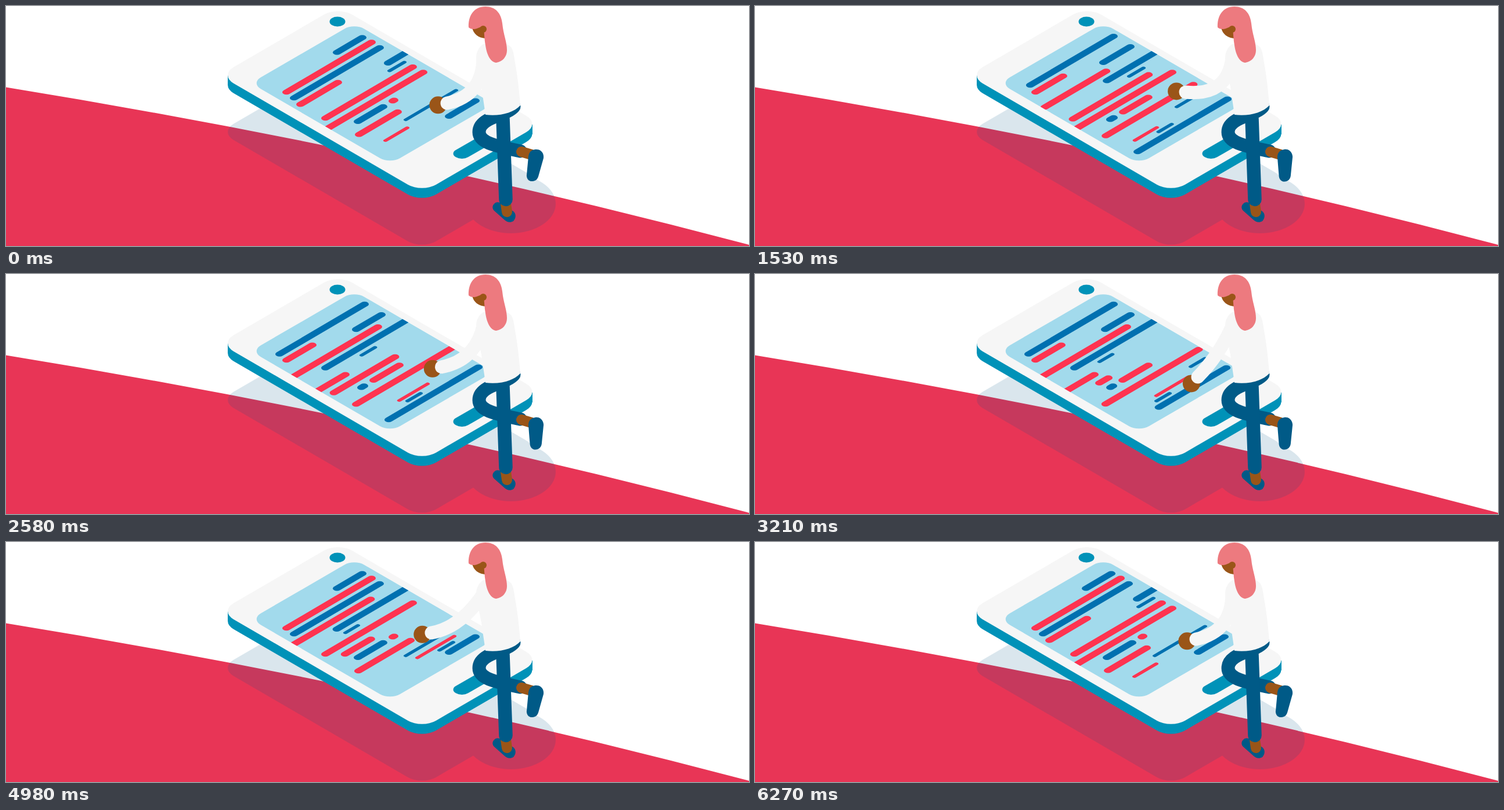
Animation of 1280x415 px, one loop 6.3 s. Source, as an HTML page:

```html
<!DOCTYPE html>
<html lang="en">
<head>
<meta charset="utf-8">
<title>Phone coding</title>
<style>
  html, body { margin: 0; width: 100%; height: 100%; overflow: hidden; background: #fff; }
  svg { display: block; width: 100%; height: 100%; }
  .round { fill: none; stroke-linecap: round; }
</style>
</head>
<body>
<svg viewBox="0 0 1280 415">
  <defs>
    <!-- Isometric plates: rounded rectangles turned 45 degrees, then flattened -->
    <rect id="plate" width="493" height="288.5" rx="34" transform="translate(572 .8) scale(1 .583) rotate(45)"/>
    <rect id="screen" width="339" height="252" rx="24" transform="translate(600 29.5) scale(1 .583) rotate(45)"/>
    <clipPath id="screenClip"><use href="#screen"/></clipPath>
  </defs>

  <path fill="#e83556" d="M0 140.500Q665 249 1280 413V415H0Z"/>
  <g fill="#005587" opacity=".14">
    <use href="#plate" y="98"/>
    <ellipse cx="870" cy="342" rx="77" ry="51"/>
  </g>

  <g fill="#0092b8">
    <use href="#plate" y="17"/>
    <path d="M382 120L907 205V222L382 137Z"/>
  </g>
  <use href="#plate" fill="#f6f6f6"/>
  <ellipse cx="571" cy="27" rx="13.500" ry="8.500" fill="#0092b8"/>
  <use href="#screen" fill="#a2daec"/>
  <g clip-path="url(#screenClip)">
    <g id="bars" class="round" transform="scale(1 .59)"></g>
  </g>
  <path class="round" transform="scale(1 .58)" stroke="#0092b8" stroke-width="30" d="M785.500 440L818 407.500"/>

  <!-- Legs -->
  <g class="round" stroke="#005a87">
    <path stroke-width="23" d="M875 174C862 190 815 192 815 218C815 238 850 243 886 251"/>
    <path stroke="#9a5518" stroke-width="18" d="M888 252L905 257"/>
    <path id="shoe" fill="#005a87" stroke="none"
      d="M900 260C901 252 906 248 914 248C922 248 927 255 926 263L917 295C915 301 911 303 906 303C900 303 896.500 298 897 292Z"/>
    <path fill="#005a87" stroke="none"
      d="M841 342C845 338 850 339 854 342L874 355C880 360 878 368 874 372C869 375 863 374 859 370L841 354C837 350 838 345 841 342Z"/>
    <path stroke="#9a5518" stroke-width="18" d="M861 342L863 356"/>
    <path stroke-width="23.500" d="M856 195L861 334.500"/>
  </g>

  <!-- Arm and upper body -->
  <circle id="hand" r="15" fill="#9a5518"/>
  <path id="arm" class="round" stroke="#f6f6f6" stroke-width="23"/>
  <path fill="#f6f6f6" d="M822 66C812 73 808 84 811 98L819 140L826 188C850 191 874 185 886 172C884 140 879 108 874 80C872 72 868 68 862 66Z"/>
  <path fill="#9a5518" d="M803 37C805 48 813 55 826 56V34Z"/>
  <path fill="#ed7a7f" d="M797 37C796 17 806 1 826 1C844 1 853 13 855 30C857 50 863 62 863 76C863 90 853 97 844 98C833 96 828 82 826 68C824 56 824 48 823 36C817 35 813 40 806 40Q800 40 797 37Z"/>
  <circle cx="822" cy="40" r="6" fill="#9a5518"/>
</svg>

<script>
const LOOP = 6300, SLOPE = 0.59, FIRST_ROW = 416.6, ROW_PITCH = 17.6, HAND_OFFSET = 16;
const BLUE = '#0070b0', RED = '#ff3350', THICK = 14.5, THIN = 7.5;
const byId = id => document.getElementById(id);
const clamp = v => Math.min(1, Math.max(0, v));
const mix = (a, b, u) => a + (b - a) * u;

// 0 at rest, 1 when fully moved: leaves at `out`, returns from `back`.
const away = (t, { out, back, outSpan = 1000, backSpan = 1000 }) =>
  clamp((t - out) / outSpan) - clamp((t - back) / backSpan);

// Waves of edits passing over the screen.
const EARLY = { out: 350, back: 2860 };
const MAIN = { out: 560, back: 3840 };
const LATE = { out: 1050, back: 4800 };
const SLOW = { out: 1000, back: 5000, outSpan: 2500, backSpan: 1270 };
const STEP = { out: 1060, back: 3300, outSpan: 470, backSpan: 860 };

const bars = [];

// A bar spans left..right on its row; `move` is how far each edge travels during its wave.
function bar(color, width, row, left, right, wave, move) {
  const node = document.createElementNS('http://www.w3.org/2000/svg', 'path');
  node.setAttribute('stroke', color);
  node.setAttribute('stroke-width', width);
  byId('bars').append(node);
  const axis = (FIRST_ROW + ROW_PITCH * row) / SLOPE;
  bars.push(t => {
    const u = away(t, wave);
    const x1 = left + width / 2 + (move.left || 0) * u;
    const x2 = right - width / 2 + (move.right || 0) * u;
    node.setAttribute('d', `M${x1} ${axis - x1}L${x2} ${axis - x2}`);
  });
}

bar(BLUE, THICK, 0, 563, 621, MAIN, { left: -99, right: 4 });
bar(RED, THICK, 1, 476, 637, MAIN, { right: -102 });
bar(BLUE, THICK, 2, 489, 651, { ...MAIN, back: 3435 }, { left: 107, right: 3 });
bar(RED, THICK, 3, 500, 579, LATE, { left: -17, right: 69 });
bar(BLUE, THICK, 4, 651, 705, LATE, { left: -108 });
bar(BLUE, THIN, 4.85, 657, 690, SLOW, { left: -76, right: -80 });
bar(RED, THICK, 5.8, 543, 708, { ...MAIN, out: 1335 }, { left: -13, right: -116 });
bar(RED, THICK, 6.93, 535, 726, { ...LATE, out: 2140 }, { left: 51, right: -110 });
bar(BLUE, THICK, 8, 599, 657, MAIN, { left: 6, right: -33 });
bar(RED, THICK, 8, 659, 676, MAIN, { left: -33, right: 9 });
bar(RED, THICK, 9.35, 601, 682, { ...EARLY, out: 750, backSpan: 2700 }, { left: -5, right: 103 });
bar(BLUE, THIN, 10.6, 685, 779, { ...MAIN, out: 920 }, { left: 62 });
bar(RED, THIN, 11.47, 650, 695, { ...SLOW, out: 1500 }, { left: 55, right: 81 });
bar(BLUE, THIN, 12, 810, 842, { ...MAIN, back: 4530 }, { left: -122, right: -124 });
bar(BLUE, THICK, 12.75, 756, 816, EARLY, { left: -104, right: 5 });

// Arm poses: cuff and elbow; the hand follows the line of the forearm.
const REST = [760, 168, 821, 155];
const FAR = [742, 149, 814, 156];
const LOW = [763, 178, 800, 140];
const NEAR = [733, 157, 783, 148];
const reach = [[240, REST], [1170, FAR], [2150, FAR], [3210, LOW], [4980, NEAR], [6200, REST]];

function armPose(t) {
  const next = reach.findIndex(([time]) => time > t);
  if (next < 1) return REST;
  const [[start, from], [end, to]] = reach.slice(next - 1, next + 1);
  return from.map((v, i) => mix(v, to[i], (t - start) / (end - start)));
}

function draw(t) {
  bars.forEach(update => update(t));
  const [cuffX, cuffY, elbowX, elbowY] = armPose(t);
  const forearm = Math.hypot(cuffX - elbowX, cuffY - elbowY);
  const reachBy = 1 + HAND_OFFSET / forearm;
  const handX = mix(elbowX, cuffX, reachBy), handY = mix(elbowY, cuffY, reachBy);
  byId('hand').setAttribute('transform', `translate(${handX} ${handY})`);
  byId('arm').setAttribute('d', `M822 90Q${elbowX} ${elbowY} ${cuffX} ${cuffY}`);
  byId('shoe').setAttribute('transform', `rotate(${-10 * away(t, STEP)} 913 261)`);
}

function tick() {
  draw(performance.now() % LOOP);
  requestAnimationFrame(tick);
}
tick();
</script>
</body>
</html>
```
